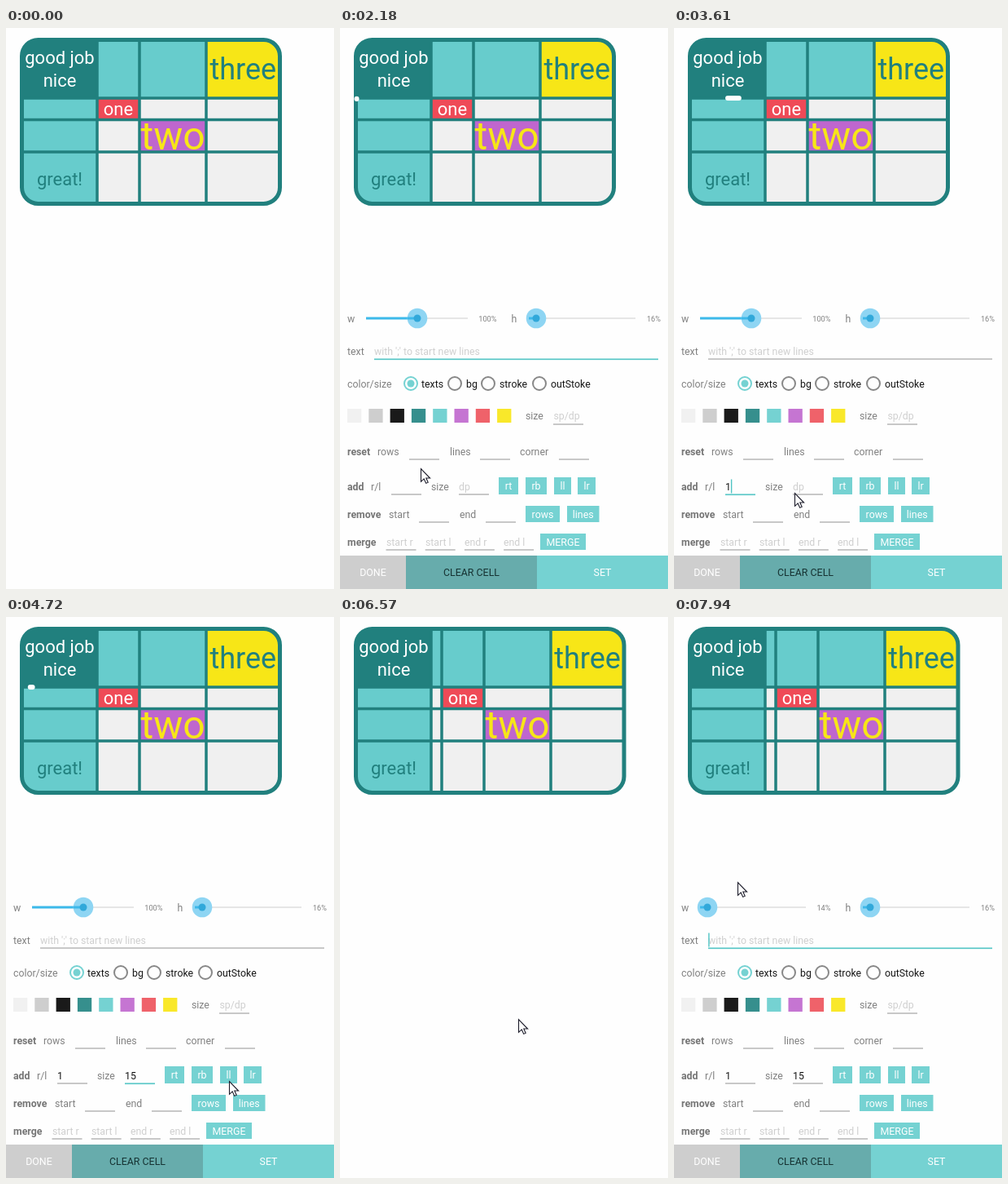
Write an HTML page that moves like this. It is 403 by 688 pixels and loops after 7990 ms.

```html
<!DOCTYPE html>
<html lang="en">
<head>
<meta charset="utf-8">
<title>Table editor</title>
<style>
html, body { margin: 0; width: 100%; height: 100%; overflow: hidden; background: #fefefe; }
svg { display: block; width: 403px; height: 688px; font-family: Roboto, "Noto Sans", sans-serif; }
#panel { font-size: 12.3px; }
text { white-space: pre; }
</style>
</head>
<body>
<svg id="stage" viewBox="0 0 403 688">
  <g id="tables"></g>
  <path id="marker" d="M20.5 86H112V112.5H20.5Z" fill="none" stroke="#fff" stroke-width="6" stroke-linecap="round" stroke-linejoin="round"/>
  <g id="panel"></g>
  <path id="pointer" d="M.5 .5V16.3L4.2 12.9L6.7 18.4L9.2 17.3L6.8 12H11.6Z" fill="#fff" stroke="#1c1c2a" stroke-width="1.1"/>
</svg>
<script>
const LOOP = 7990;
const DARK = '#21807e', TEAL = '#67cccc', AQUA = '#75d2d2', PALE = '#f0f0f0';
const GREY = '#808080', HINT = '#cfcfcf', RULE = '#a6a6a6', INK = '#161616';
const $ = id => document.getElementById(id);
const panel = $('panel');

function add(parent, tag, attrs, content) {
  const el = document.createElementNS('http://www.w3.org/2000/svg', tag);
  for (const k in attrs) el.setAttribute(k, attrs[k]);
  if (content !== undefined) el.textContent = content;
  parent.appendChild(el);
  return el;
}
const show = (el, on) => { el.style.display = on ? '' : 'none'; };
const box = (p, x, y, w, h, fill) => add(p, 'rect', { x, y, width: w, height: h, fill });
const label = (p, x, y, s, fill, more) => add(p, 'text', { x, y, fill, ...more }, s);
const mid = (p, x, y, s, fill, size) => label(p, x, y, s, fill, { 'text-anchor': 'middle', 'font-size': size });

// ---- table ----
function makeTable(id, cols) {
  const rows = [14.5, 86, 112.5, 152, 215.5];
  const n = cols.length - 1, right = cols[n];
  const g = add($('tables'), 'g', {});
  const frame = { x: 19.5, y: 14.5, width: right - 19.5, height: 201, rx: 20 };
  add(add(g, 'clipPath', { id }), 'rect', frame);
  const cells = add(g, 'g', { 'clip-path': `url(#${id})` });
  const one = n - 3, two = n - 2, three = n - 1;
  const fillOf = (r, c) => {
    if (r + c === 0) return DARK;
    if (r === 0) return c === three ? '#f7e617' : TEAL;
    if (c === 0) return TEAL;
    if (r === 1 && c === one) return '#ef4a57';
    if (r === 2 && c === two) return '#bf66ce';
    return PALE;
  };
  for (let r = 0; r < 4; r++)
    for (let c = 0; c < n; c++)
      box(cells, cols[c], rows[r], cols[c + 1] - cols[c], rows[r + 1] - rows[r], fillOf(r, c));
  let d = '';
  for (const x of cols.slice(1, n)) d += `M${x} 15V215`;
  for (const y of rows.slice(1, 4)) d += `M20 ${y}H${right}`;
  add(g, 'path', { d, stroke: DARK, 'stroke-width': 3.5 });
  add(g, 'rect', { ...frame, fill: 'none', stroke: DARK, 'stroke-width': 5 });

  const centre = c => (cols[c] + cols[c + 1]) / 2;
  mid(g, 66, 43.5, 'good job', '#fff', 22);
  mid(g, 66, 72, 'nice', '#fff', 22);
  mid(g, 66, 192.5, 'great!', DARK, 22);
  mid(g, centre(one), 107, 'one', '#fff', 22);
  mid(g, centre(two), 149, 'two', '#f7e617', 48);
  mid(g, centre(three), 62.5, 'three', DARK, 36);
  return g;
}
const before = makeTable('clipA', [19.5, 112, 164, 246, 336.5]);
const after = makeTable('clipB', [19.5, 112, 125, 177, 259, 349]);

// ---- panel ----
function slider(x, end) {
  const track = add(panel, 'path', { stroke: '#e6e6e6', 'stroke-width': 2 });
  const active = add(panel, 'path', { stroke: '#3db9ea', 'stroke-width': 3 });
  const halo = add(panel, 'circle', { cy: 356, r: 12.3, fill: '#8ed5f3' });
  const bar = add(panel, 'path', { stroke: '#3db9ea', 'stroke-width': 3 });
  const knob = add(panel, 'circle', { cy: 356, r: 4.5, fill: '#31a8da' });
  const value = label(panel, end, 359.5, '', GREY, { 'text-anchor': 'end', 'font-size': 9.2 });
  return (pos, right, text) => {
    track.setAttribute('d', `M${x} 356H${right}`);
    active.setAttribute('d', `M${x} 356H${pos}`);
    bar.setAttribute('d', `M${Math.max(x, pos - 12)} 356H${pos}`);
    halo.setAttribute('cx', pos);
    knob.setAttribute('cx', pos);
    value.textContent = text;
  };
}
const rule = (x, y, w = 37) => box(panel, x, y - .6, w, 1.2, RULE);
const name = (x, y, s) => label(panel, x, y, s, GREY);
const hint = (x, y, s) => label(panel, x, y, s, HINT);
const strong = (y, s) => label(panel, 9, y, s, '#757575', { 'font-weight': 700 });
function button(x, y, w, h, s, fill = AQUA, ink = '#fff') {
  box(panel, x, y, w, h, fill);
  mid(panel, x + w / 2, y + h / 2 + 4.5, s, ink, 12.4);
}

name(9, 361, 'w');
name(210.5, 361, 'h');
const setW = slider(32, 192.5), setH = slider(232, 394);
setH(241, 363, '16%');

name(9, 401, 'text');
hint(42, 401, "with ';' to start new lines");
const textRule = rule(42, 406, 349);

name(9, 441, 'color/size');
[[87, 'texts'], [141, 'bg'], [182, 'stroke'], [245, 'outStoke']].forEach(([cx, s], i) => {
  add(panel, 'circle', { cx, cy: 436, r: 8, fill: 'none', stroke: i ? '#888' : AQUA, 'stroke-width': 2 });
  if (!i) add(panel, 'circle', { cx, cy: 436, r: 4.5, fill: AQUA });
  label(panel, cx + (i ? 14 : 13), 441, s, INK);
});

['#f1f1f1', '#cecece', '#1a1a1a', '#368f8d', AQUA, '#c575d2', '#ef626a', '#f9e82a']
  .forEach((c, i) => box(panel, 9 + i * 26.3, 467, 17.3, 17, c));
name(228, 480, 'size');
hint(262.5, 480, 'sp/dp');
rule(262, 486);

strong(524, 'reset');
[['rows', 46, 85], ['lines', 135, 172], ['corner', 221, 269]].forEach(([s, x, u]) => {
  name(x, 524, s);
  rule(u, 529);
});

strong(567, 'add');
name(38, 567, 'r/l');
name(112, 567, 'size');
const countRule = rule(63, 572), sizeRule = rule(146, 572);
const countText = label(panel, 63, 567, '', INK);
const sizeText = label(panel, 146, 567, '', INK);
const sizeHint = hint(146, 567, 'dp');
button(195, 551, 24, 21, 'rt');
button(228, 551, 26, 21, 'rb');
button(263, 551, 21, 21, 'll');
button(292, 551, 22, 21, 'lr');

strong(601, 'remove');
name(60, 601, 'start');
rule(97, 606);
name(147, 601, 'end');
rule(179, 606);
button(228, 586, 42, 20, 'rows');
button(279, 586, 39.5, 20, 'lines');

strong(635, 'merge');
['start r', 'start l', 'end r', 'end l'].forEach((s, i) => {
  hint(57 + i * 48, 635, s);
  rule(56.5 + i * 48.2, 640);
});
button(246, 620, 56, 20, 'MERGE');

button(0, 647, 81, 41, 'DONE', '#cecece');
button(81, 647, 161, 41, 'CLEAR CELL', '#67acac', '#173434');
button(242, 647, 161, 41, 'SET');
const caret = box(panel, 0, 0, 1.4, 17, '#4fc4c4');

// ---- timeline ----
const OPEN = 1430, ADDED = 5550, CLOSED = 5670, REOPEN = 7640;
const path = [
  [620, 367, 188], [1270, 81, 99], [1430, 81, 99], [2180, 99, 540],
  [2860, 70, 566], [3050, 70, 566], [3610, 148, 570], [3820, 154, 577],
  [3910, 154, 577], [4300, 214, 591], [4720, 274, 569], [5340, 303, 565],
  [6100, 303, 565], [6570, 219, 493], [6870, 104, 161], [7180, 138, 90],
  [7440, 117, 97], [7640, 117, 97], [7940, 78, 325], [7990, 75, 340]
];

// Monotone cubic through the waypoints on one axis.
function along(t, axis) {
  const slope = i => path[i] && path[i + 1]
    ? (path[i + 1][axis] - path[i][axis]) / (path[i + 1][0] - path[i][0]) : 0;
  const tangent = i => {
    const a = slope(i - 1), b = slope(i);
    return i > 0 && a * b > 0 ? 2 * a * b / (a + b) : 0;
  };
  let i = 0;
  while (i < path.length - 2 && t >= path[i + 1][0]) i++;
  const [t0] = path[i], h = path[i + 1][0] - t0, s = (t - t0) / h;
  const a = path[i][axis], b = path[i + 1][axis], q = 1 - s;
  return a * (1 + 2 * s) * q * q + h * tangent(i) * s * q * q
    + b * s * s * (3 - 2 * s) - h * tangent(i + 1) * s * s * q;
}

// A dash that circles the selected cell, longest half way round.
function drawMarker(t) {
  const start = 1594, period = 608.6, around = 236;
  const on = t >= start && t < ADDED;
  show($('marker'), on);
  if (!on) return;
  const v = (t - start) / period % 1;
  const u = .5 - .5 * Math.cos(Math.PI * v);
  const len = Math.max(.01, 62 * Math.min(u, 1 - u));
  $('marker').setAttribute('stroke-dasharray', `${len} ${around * 2}`);
  $('marker').setAttribute('stroke-dashoffset', -(u * around - len / 2));
}

function drawPanel(t) {
  const on = t >= OPEN && t < CLOSED || t >= REOPEN;
  show(panel, on);
  if (!on) return;
  panel.style.opacity = t >= ADDED && t < CLOSED ? .5 : 1;
  if (t < REOPEN) setW(95, 157, '100%'); else setW(41, 162, '14%');
  countText.textContent = t < 3400 ? '' : '1';
  sizeText.textContent = t < 4060 ? '' : t < 4150 ? '1' : '15';
  show(sizeHint, t < 4060);

  const focus = t >= REOPEN || t < 2880 ? 0 : t < 3970 ? 1 : 2;
  [textRule, countRule, sizeRule].forEach((r, i) => {
    r.setAttribute('fill', i === focus ? '#5cc8c8' : RULE);
    r.setAttribute('height', i === focus ? 1.7 : 1.2);
  });
  const since = [OPEN, 2880, 3400, 3970, 4060, 4150, REOPEN].filter(k => k <= t).pop();
  show(caret, (t - since) % 1000 < 500);
  const typed = focus === 1 ? countText.textContent : focus === 2 ? sizeText.textContent : '';
  caret.setAttribute('x', [42.2, 63, 146][focus] + typed.length * 6.9);
  caret.setAttribute('y', focus ? 553.5 : 387.5);
}

function draw(now) {
  const t = now % LOOP;
  show(before, t < ADDED);
  show(after, t >= ADDED);
  drawMarker(t);
  drawPanel(t);
  show($('pointer'), t >= 620);
  if (t >= 620) $('pointer').setAttribute('transform', `translate(${along(t, 1)} ${along(t, 2)})`);
}

let begin;
function tick(now) {
  begin ??= now;
  draw(Math.max(0, now - begin));
  requestAnimationFrame(tick);
}
draw(0);
requestAnimationFrame(tick);
</script>
</body>
</html>
```
